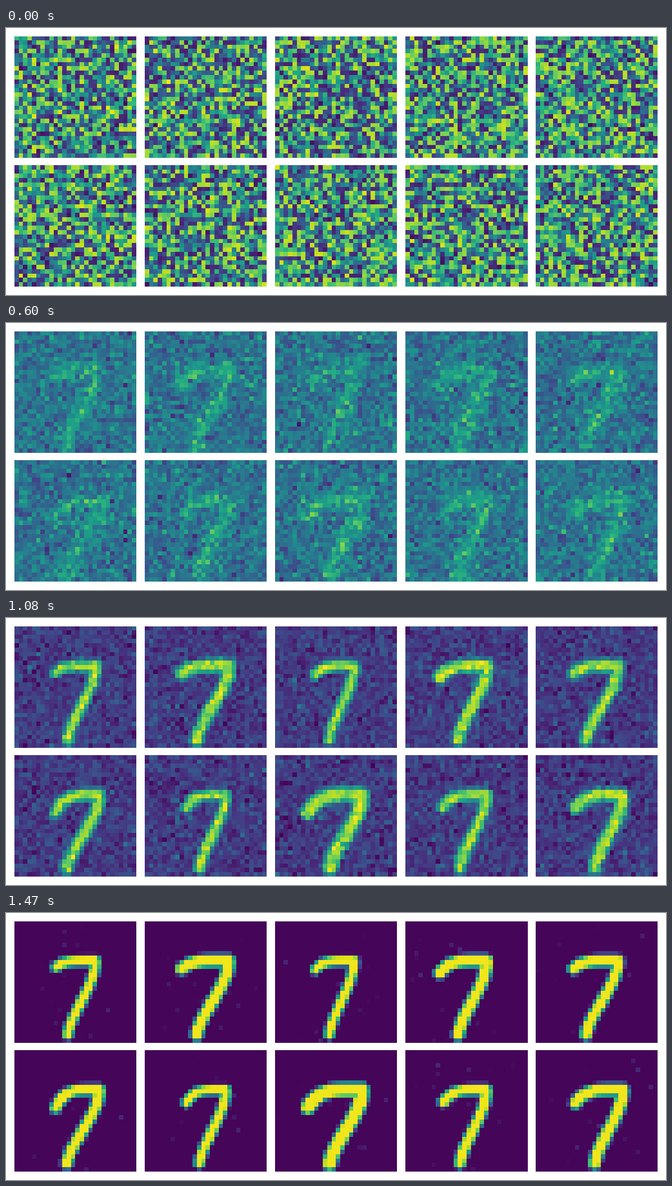
Recreate the animation shown at these times as a matplotlib script. Size 1175 px wide and 477 px high, loop 1.5 s.

```python
import numpy as np
import matplotlib.pyplot as plt
from matplotlib.animation import FuncAnimation

W, H, DPI = 1175, 477, 64
GRID, SIDE, COLS = 28, 217, 5
FRAMES, INTERVAL = 50, 30
BAR_Y, FOOT_Y = 9.15, 26.1

# Key points of each handwritten seven: tip x, tip y, corner x, foot x
SEVENS = [
    (9.6, 10.6, 18.6, 12.3), (8.5, 11.0, 19.3, 12.0), (9.3, 11.2, 18.1, 12.5),
    (7.9, 11.9, 18.6, 12.1), (8.7, 11.0, 18.9, 11.6), (9.5, 13.3, 19.5, 12.1),
    (9.6, 12.1, 18.6, 12.6), (7.6, 13.2, 20.0, 12.6), (8.8, 11.9, 18.5, 12.5),
    (9.2, 12.2, 20.0, 13.6),
]

rng = np.random.default_rng(7)
cy, cx = np.mgrid[0:GRID, 0:GRID] + .5


def stroke_depth(tip_x, tip_y, corner_x, foot_x):
    """How far each cell lies inside the stroke; negative outside."""
    t = np.linspace(0, 1, 60)
    bar_x = tip_x + (corner_x - tip_x) * t
    bar_y = BAR_Y + (tip_y - BAR_Y) * (1 - t) ** 5
    leg_x = foot_x + (corner_x - foot_x) * np.sin(np.pi / 2 * (1 - t) ** 1.4)
    leg_y = BAR_Y + (FOOT_Y - BAR_Y) * t
    px, py = np.append(bar_x, leg_x), np.append(bar_y, leg_y)
    dist = np.hypot(cx[..., None] - px, cy[..., None] - py).min(axis=-1)
    return .13 * (corner_x - tip_x) - dist   # wider digits have thicker strokes


def drifting_noise(shape, keep=.8):
    """Gaussian noise that is partly renewed at every step."""
    noise = rng.normal(size=(FRAMES, *shape))
    for n in range(1, FRAMES):
        noise[n] = keep * noise[n - 1] + np.sqrt(1 - keep ** 2) * noise[n]
    return noise


depth = np.array([stroke_depth(*seven) for seven in SEVENS])
noise = drifting_noise(depth.shape)
static = (.49 + .42 * np.sin(1.4 * rng.uniform(-1, 1, depth.shape))
          + .025 * rng.normal(size=depth.shape))


def cells(n):
    """Values of all panels: static gives way to haze, then to clean digits."""
    haze = np.cos(np.pi / 2 * n / (FRAMES - 1)) ** 1.2
    paper = .012 + .48 * haze
    ink = .98 - .49 * haze ** 1.3
    blur = 1.05 + 4 * haze ** 2
    shape = np.clip(depth / blur + .5, 0, 1)
    grain = .112 * np.sqrt(haze) * noise[n]
    specks = .1 * (1 - haze) ** 4 * np.clip(noise[n] - 1.9, 0, 1) * (depth > -7)
    picture = paper + (ink - paper) * shape + grain + specks
    mix = np.exp(-n)
    return np.clip(mix * static + (1 - mix) * picture, .008, .985)


fig = plt.figure(figsize=(W / DPI, H / DPI), dpi=DPI, facecolor="white")
images = []
for i, data in enumerate(static):
    left, top = 15 + 232 * (i % COLS), 15 + 230 * (i // COLS)
    ax = fig.add_axes([left / W, 1 - (top + SIDE) / H, SIDE / W, SIDE / H])
    ax.axis("off")
    images.append(ax.imshow(data, cmap="viridis", vmin=0, vmax=1,
                            interpolation="nearest", aspect="auto"))


def draw(n):
    for image, data in zip(images, cells(n)):
        image.set_data(data)
    return images


anim = FuncAnimation(fig, draw, frames=FRAMES, interval=INTERVAL,
                     repeat=True, repeat_delay=0)
plt.show()
```
